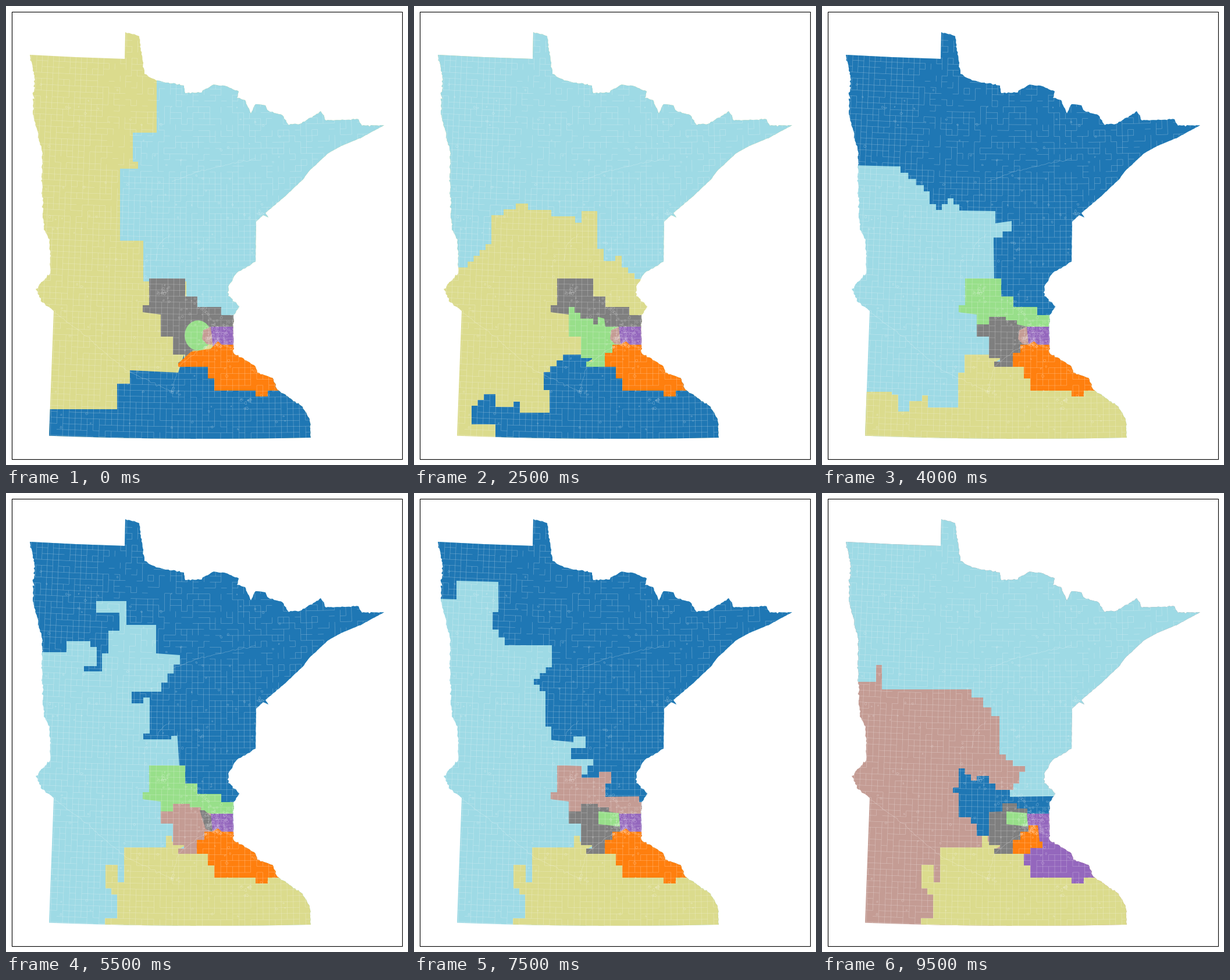
A matplotlib script for the animation above (10 s loop, 691 by 790 pixels).

```python
import matplotlib.pyplot as plt
import numpy as np
from matplotlib.animation import FuncAnimation
from matplotlib.collections import LineCollection
from matplotlib.patches import Polygon, Rectangle

W, H, DPI = 691, 790, 100
CELL = 10.2
BLUE, ORANGE, GREEN, PURPLE = "#1f77b4", "#ff7f0e", "#98df8a", "#9467bd"
PINK, GRAY, KHAKI, CYAN = "#c49c94", "#7f7f7f", "#dbdb8d", "#9edae5"
rng = np.random.default_rng(11)


def steps(*keys):
    """Staircase through key points with treads about one township wide."""
    pts = [keys[0]]
    for (x0, y0), (x1, y1) in zip(keys, keys[1:]):
        dx, dy = x1 - x0, y1 - y0
        low = min(abs(dx), abs(dy))
        if low >= 5:
            n = max(1, int(low / 10))
            for i in range(n):
                x = x0 + dx * (i + 1) / n
                pts += [(x, y0 + dy * i / n), (x, y0 + dy * (i + 1) / n)]
        pts.append((x1, y1))
    return pts


def wobble(keys, amp, piece=3):
    """Break a line into short pieces with a slight random wobble."""
    pts = np.array(keys, float)
    out = []
    for a, b in zip(pts, pts[1:]):
        n = max(1, int(np.hypot(*(b - a)) / piece))
        seg = a + (b - a) * np.arange(n)[:, None] / n
        seg[1:] += rng.normal(0, amp, (n - 1, 2))
        out += seg.tolist()
    return out


def north(*keys):
    line = steps(*keys)
    return line + [(700, line[-1][1]), (700, -30), (line[0][0], -30)]


def south(*keys):
    line = steps(*keys)
    return line + [(306, 600), (306, 608), (296, 614), (296, 621), (360, 621),
                   (360, 640), (540, 640), (540, 760), (line[0][0], 760)]


# State outline
lakes = [(205, 45), (229, 52), (238, 117), (258, 128), (306, 137), (308, 150),
         (333, 149), (355, 136), (375, 137), (400, 147), (397, 158), (411, 162),
         (421, 185), (429, 169), (446, 171), (452, 181), (475, 188), (486, 205),
         (508, 202), (541, 181), (550, 197), (606, 195), (612, 206), (650, 205)]
shore = [(650, 205), (612, 226), (576, 241), (553, 254), (522, 283), (510, 299),
         (478, 329), (446, 356), (451, 364), (442, 360), (430, 371), (429, 440)]
rivers_east = [(429, 440), (397, 459), (382, 483), (382, 499), (401, 517),
               (391, 532), (391, 597), (429, 621), (432, 631), (458, 640),
               (466, 660), (510, 690), (522, 711), (524, 743)]
bottom = [(x, 745 - 7e-5 * (x - 350) ** 2) for x in np.linspace(524, 74, 12)]
rivers_west = [(74, 739), (82, 525), (62, 510), (51, 487), (76, 460), (75, 402),
               (65, 385), (62, 325), (62, 250), (46, 183), (49, 120), (41, 84)]
OUTLINE = ([(41, 84), (120, 88), (204, 91)] + wobble(lakes, .6) + wobble(shore, .2)
           + wobble(rivers_east, .6) + bottom + rivers_west[:1]
           + wobble(rivers_west[1:], .7))

# Northern districts
N_EAST = north((259, -30), (259, 218), (218, 234), (218, 268), (227, 280),
               (196, 280), (196, 404), (236, 404), (236, 474), (310, 474), (310, 540))
N_WIDE = north((-20, 449), (82, 450), (123, 410), (133, 380), (133, 360), (175, 340),
               (196, 351), (236, 362), (277, 373), (288, 353), (315, 353), (315, 418),
               (326, 439), (346, 430), (357, 450), (379, 470))
N_SLOPE = north((-20, 272), (125, 276), (135, 287), (175, 319), (185, 341),
                (196, 351), (216, 331), (236, 352), (298, 353), (298, 374),
                (326, 370), (326, 388), (295, 409), (296, 470), (308, 540))
N_HOOK = north((-20, 272), (73, 274), (104, 255), (145, 265), (156, 298), (134, 307),
               (165, 307), (165, 276), (176, 237), (195, 206), (155, 206), (155, 186),
               (207, 186), (207, 227), (248, 227), (258, 276), (299, 279), (299, 295),
               (267, 342), (216, 342), (216, 362), (236, 352), (247, 414), (236, 424),
               (284, 418), (294, 409), (298, 470), (308, 540))
N_STEEP = north((-20, 180), (73, 183), (73, 151), (145, 153), (145, 205), (135, 235),
                (156, 262), (237, 269), (237, 300), (206, 330), (226, 352), (226, 402),
                (236, 425), (274, 429), (274, 419), (295, 419), (295, 439), (270, 458),
                (308, 469), (288, 500), (318, 540))
N_DOME = north((-20, 325), (72, 325), (93, 316), (93, 296), (103, 338), (237, 338),
               (257, 352), (277, 369), (305, 399), (305, 450), (328, 470), (349, 480),
               (339, 500), (329, 511), (323, 540))

# Southern districts
S_LOW = south((-20, 694), (191, 701), (191, 650), (213, 650), (213, 627), (296, 631))
S_ARM = south((140, 760), (140, 720), (99, 711), (99, 688), (120, 668), (140, 668),
              (140, 690), (171, 681), (182, 700), (233, 691), (233, 661), (223, 630),
              (256, 600))
S_BAND = south((-20, 664), (120, 669), (131, 698), (150, 698), (150, 680), (172, 670),
               (182, 691), (254, 691), (234, 672), (234, 631), (245, 620), (245, 600))
S_BLOCK = south((170, 760), (170, 732), (191, 732), (191, 691), (171, 670), (171, 640),
                (192, 650), (192, 670), (203, 629), (203, 610), (275, 610), (275, 590),
                (285, 600))

# Metro districts
UP_WEST = [(262, 469), (246, 474), (246, 515), (235, 527), (266, 531)]
UP_EAST = [(400, 552), (400, 532), (370, 518), (329, 500), (308, 500), (308, 469)]
RAGGED = [(330, 552), (400, 552), (400, 532), (387, 522), (323, 523)]
SHOULDER = RAGGED + [(329, 500), (339, 500), (339, 480), (318, 480), (318, 490),
                     (288, 490), (288, 470)]
LEG = [(266, 569), (287, 569)]
FOOT = [(266, 548), (287, 548)]
U_TAIL = steps(*UP_WEST, *LEG, (287, 600), (308, 609), (345, 560), *UP_EAST)
U_PLAIN = steps(*UP_WEST, *FOOT, (330, 552), *UP_EAST)
U_SHOULDER = steps(*UP_WEST, *FOOT, *SHOULDER)
U_FOOT = steps(*UP_WEST, *LEG, *SHOULDER)
U_RIVER = steps((235, 474), (256, 495), (266, 487), (287, 500), (298, 511), (323, 511),
                *RAGGED[::-1], (287, 560), (287, 590), (266, 590), (266, 569),
                (256, 558), (235, 558), (235, 516), (225, 507), (235, 507))

CORE = [(353, 552), (355, 583), (341, 583), (341, 597), (328, 597), (328, 621),
        (296, 621), (296, 612), (306, 606), (287, 600)]
C_ROUND = [(330 - 23 * np.cos(t), 567 + 26 * np.sin(t))
           for t in np.linspace(0, 2 * np.pi, 24)]
C_RIGHT = steps(*UP_EAST[:-1]) + C_ROUND
C_HORN = steps((266, 518), (286, 538), (308, 548), (316, 535), (327, 538), (329, 552),
               *CORE, *LEG[::-1])
C_FLAT = steps(*FOOT, (287, 535), (316, 541), (335, 548), *CORE, *LEG[::-1])
C_PEAK = steps((287, 549), (310, 548), (310, 534), (335, 543), *CORE)

D_SMALL = [(339, 558), (352, 552), (355, 583), (345, 582), (337, 573)]
D_SLIM = [(333, 546), (341, 546), (354, 558), (355, 583), (343, 578)]
D_WIDE = [(317, 548), (353, 551), (354, 574), (317, 570)]
E_RIVER = [(352, 552), (400, 552), (400, 590), (356, 590)]
VALLEY = steps((341, 621), (347, 641), (358, 662), (429, 662), (429, 672), (450, 672),
               (450, 662), (500, 662)) + [(440, 583), (371, 583), (364, 577)]
O_LONG = [(296, 621)] + VALLEY + [(352, 590), (318, 595), (296, 615)]
O_SHORT = [(328, 621)] + VALLEY + [(354, 583), (341, 583), (341, 597), (328, 597)]
O_CITY = steps((328, 621), (328, 597), (341, 583), (355, 572), (371, 572), (374, 600),
               (379, 611), (358, 621))
ALL = [(0, 0), (W, 0), (W, H), (0, H)]

# What each half-second step redraws, bottom layer first; the rest carries over.
STEPS = [
    dict(mid=(ALL, KHAKI), north=(N_EAST, CYAN), south=(S_LOW, BLUE),
         upper=(U_TAIL, GRAY), core=(C_ROUND, GREEN), dot=(D_SMALL, PINK),
         east=(E_RIVER, PURPLE), valley=(O_LONG, ORANGE), city=(O_CITY, "none")),
    dict(south=(S_ARM, BLUE)),
    dict(core=(C_RIGHT, GREEN)),
    dict(upper=(U_PLAIN, GRAY), core=(C_HORN, GREEN)),
    dict(north=(N_WIDE, CYAN)),
    dict(valley=(O_SHORT, ORANGE)),
    dict(mid=(ALL, BLUE), south=(S_BAND, KHAKI)),
    dict(upper=(U_PLAIN, GREEN), core=(C_FLAT, GRAY)),
    dict(mid=(ALL, CYAN), north=(N_SLOPE, BLUE)),
    dict(south=(S_BLOCK, KHAKI)),
    dict(core=(C_FLAT, PINK), dot=(D_SLIM, GRAY)),
    dict(north=(N_HOOK, BLUE)),
    dict(north=(N_STEEP, BLUE)),
    dict(core=(C_FLAT, GRAY), dot=(D_WIDE, PINK)),
    dict(upper=(U_PLAIN, PINK), dot=(D_WIDE, GREEN)),
    dict(upper=(U_SHOULDER, PINK)),
    dict(mid=(ALL, BLUE), north=(N_DOME, CYAN)),
    dict(upper=(U_FOOT, PINK), core=(C_PEAK, GRAY)),
    dict(mid=(ALL, PINK), upper=(U_RIVER, BLUE)),
    dict(valley=(O_SHORT, PURPLE), city=(O_CITY, ORANGE)),
]


# Precinct lines
def project(u, v):
    """Grid to screen, with meridians fanning out and parallels bowed."""
    return 380 + u * (1 + 1.3e-4 * (v - 550)), v - 7.5e-5 * u * u


def township_lines():
    lines = []
    for v in 469.5 + CELL * np.arange(-43, 29):
        for u in -72 + CELL * np.arange(-28, 36):
            x, y = project(u, v)
            wild = (x > 165 and y < 290) or (x > 430 and y < 400)
            for end in [(u + CELL, v), (u, v + CELL)]:
                if rng.random() < (.45 if wild else .85):
                    lines.append([(x, y), project(*end)])
    return lines


def town(x, y, r):
    a = np.linspace(0, 2 * np.pi, 8)
    d = r * rng.uniform(.5, 1.2, 8)
    d[-1] = d[0]
    return np.column_stack([x + d * np.cos(a), y + d * np.sin(a)])


def towns(x, y, spread, count):
    return [town(*rng.normal((x, y), spread), rng.uniform(1, 2.8))
            for _ in range(count)]


lines = township_lines()
lines.append(wobble([(82, 528), (125, 558), (205, 626), (285, 664), (296, 620),
                     (345, 583)], .8, 4))
lines.append(wobble([(285, 302), (330, 285), (385, 272), (435, 262)], .8, 4))
lines.append(wobble([(258, 440), (262, 412), (285, 390)], .8, 4))
lines += [town(rng.uniform(60, 480), rng.uniform(130, 740), rng.uniform(1, 2.4))
          for _ in range(170)]
for city in [(270, 495, 8, 14), (435, 365, 8, 14), (415, 685, 6, 10),
             (287, 660, 6, 8), (330, 520, 14, 18), (360, 570, 15, 110)]:
    lines += towns(*city)

fig = plt.figure(figsize=(W / DPI, H / DPI), dpi=DPI, facecolor="white")
ax = fig.add_axes([0, 0, 1, 1])
ax.set(xlim=(0, W), ylim=(H, 0))
ax.axis("off")
ax.add_patch(Rectangle((10.5, 10.5), 671, 770, fill=False, ec="black", lw=.8,
                       snap=False))

state = Polygon(OUTLINE, closed=True, fc="none", ec="none")
ax.add_patch(state)
patches = {}
for z, name in enumerate(STEPS[0]):
    patches[name] = ax.add_patch(Polygon(ALL, closed=True, ec="none", lw=0,
                                         zorder=z + 2))
    patches[name].set_clip_path(state)
web = LineCollection(lines, colors="white", linewidths=.45, alpha=.33, zorder=20)
ax.add_collection(web)
web.set_clip_path(state)


def draw(frame):
    view = {}
    for change in STEPS[:frame + 1]:
        view.update(change)
    for name, (shape, color) in view.items():
        patches[name].set_xy(shape)
        patches[name].set_facecolor(color)
    return list(patches.values())


anim = FuncAnimation(fig, draw, frames=len(STEPS), interval=500, repeat=True,
                     repeat_delay=0, init_func=lambda: draw(0), blit=False)
plt.show()
```
